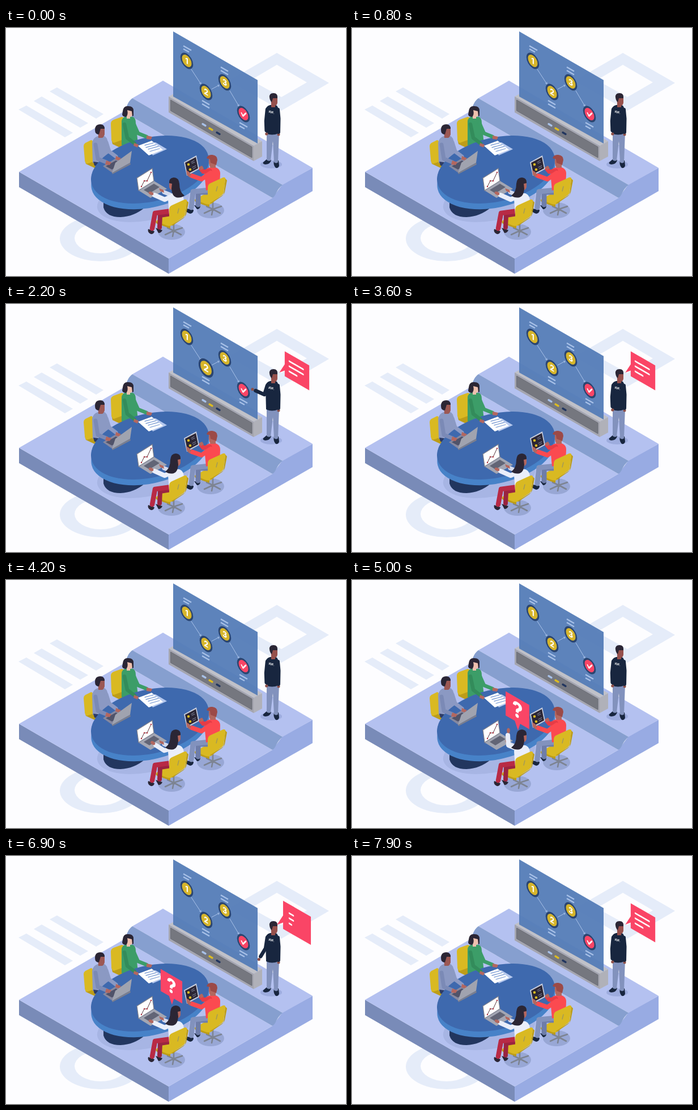
Animation of 600x438 px, one loop 8000 ms. Source, as an HTML page:

```html
<!DOCTYPE html>
<html lang="en">
<head>
<meta charset="utf-8">
<title>Team meeting</title>
<style>
html, body { margin: 0; width: 100%; height: 100%; overflow: hidden; background: #fdfdff }
svg { display: block; width: 600px; height: 438px }
text { font-family: Inter, "Open Sans", sans-serif; font-weight: 800; fill: #fff; text-anchor: middle }
.line { fill: none; stroke-linecap: round; stroke-linejoin: round }
.yellow { fill: #d9b922 } .gold { fill: #bd9d18 }
.skin { fill: #b3675f } .dark { fill: #2b2635 } .navy { fill: #18263f }
.deco { fill: #e5ecf9 }
.pale { stroke: #a8c1e8; stroke-width: 2.2; stroke-linecap: butt }
</style>
</head>
<body>
<svg viewBox="0 0 600 438">
  <defs>
    <g id="chairBase">
      <ellipse cx="292" cy="360" rx="24" ry="14" fill="#98a7d5"/>
      <path class="line" stroke="#7d8492" stroke-width="2.600" d="M296 345V358L281 365M296 358L285 353M296 358L309 365M296 358L311 353M296 358L294 368"/>
      <path class="gold" d="M264 341L290 349V354L267 346Q264 345 264 341Z"/>
      <path class="yellow" d="M264 341L284 330L313 331L294 348Q290 351 284 349Z"/>
    </g>
    <g id="chairBack">
      <path class="gold" d="M292 348L316 333L319 305L322 308L318 329Q317 333 313 336L294 349Z"/>
      <path class="yellow" d="M288 321Q288 315 293 313L315 303Q320 302 319 307L316 329Q316 332 313 334L295 346Q289 349 288 344Z"/>
      <path class="line" stroke="#a39a58" stroke-width="1.500" d="M305 319L303 327"/>
    </g>
  </defs>

  <!-- backdrop -->
  <path class="deco" fill-rule="evenodd" d="M478 44L570 97L486 146L393 93ZM478 65L432 92L486 122L531 96Z"/>
  <path class="deco" d="M22 144L36 137L118 185L104 193ZM49 129L63 121L145 168L131 176ZM77 112L90 105L172 152L159 160Z"/>
  <ellipse class="deco" cx="167" cy="372" rx="72" ry="40"/>
  <ellipse cx="167" cy="371" rx="46" ry="27" fill="#fdfdff"/>

  <!-- platform -->
  <path fill="#798bb8" d="M23 254L287 407V434L23 281Z"/>
  <path fill="#98abe3" d="M287 407L470 300L488 276L541 247V288L287 434Z"/>
  <path fill="#b4c1f0" d="M23 254L207 148L470 300L287 407ZM223 124L277 93L541 247L488 277Z"/>
  <path fill="#869fcf" d="M223 124L488 277Q481 283 477 291Q474 298 470 300L207 148Q211 145 213 138Q217 128 223 124Z"/>

  <!-- screen and console -->
  <path fill="#c0c1c8" d="M287 121L302 113L452 200L437 208Z"/>
  <path fill="#557db8" fill-opacity=".95" d="M295 6L444 92V204L295 121Z"/>
  <path fill="#a4a5af" d="M287 121L437 208V235L287 149Z"/>
  <path fill="#b0b1b9" d="M437 208L452 200V227L437 235Z"/>
  <path fill="#75777f" stroke="#63656f" stroke-width=".8" d="M290.500 127L434 210V229L290.500 146Z"/>
  <g class="line" stroke-width="3.4">
    <path stroke="#a8c1e8" d="M347 169.500L352 172.500"/>
    <path stroke="#dcbb22" d="M359 177L364 180"/>
    <path stroke="#22365f" d="M372 184.500L377 187.500"/>
  </g>
  <path class="line pale" d="M313 31.500L327 39.500M313 37L323 42.500M346 128L359 135.500M346 134L359 141.500M379 69L392 76.500M379 75L392 82.500M412 167L426 175M412 173L421 178"/>
  <path class="line" stroke="#a8c1e8" d="M327 73L344 99M341.500 97.500L344 99L344 96M363 108L376 101M373.500 101L376 101L375 103.500M395 111L411 138M408.500 136.500L411 138L411 135"/>
  <g id="steps"></g>

  <!-- presenter -->
  <ellipse cx="468" cy="241" rx="19" ry="7" fill="#9dacde"/>
  <path class="navy" d="M461 231L468 233Q467 240 458 241Q452 240 454 237ZM473 234H481L482 243Q481 248 476 247Q471 242 473 234Z"/>
  <path fill="#8292bd" d="M460 184H482L480 237Q477 240 473 237L471 200L467 234Q463 236 460 233Z"/>
  <circle cx="481" cy="188" r="2.500" fill="#8d5049"/>
  <path class="line" stroke="#18263f" stroke-width="6" d="M480 144L481.500 160L481 184"/>
  <path class="navy" d="M458 147Q458 138 466 136H476Q481 138 481 148V186Q469 191 459 186Z"/>
  <path fill="#96504c" d="M467 122H479V132Q478 137 475 137V140H468V133Z"/>
  <path class="dark" d="M465 123Q464 115 472 115Q480 115 479 124L471 124L469 131Q466 129 465 123Z"/>
  <text font-size="5.500" transform="matrix(.9 .25 0 1 468 150.500)">JOF.</text>
  <circle id="hand" r="2.600" fill="#8d5049"/>
  <path id="arm" class="line" stroke="#18263f" stroke-width="6.500"/>

  <!-- far side of the table -->
  <path class="gold" d="M186 196L206 194L217 207L207 214L188 205Z"/>
  <path class="yellow" d="M185 169Q185 164 190 162L204 157Q208 157 208 161L209 196L190 203Q186 200 186 196Z"/>
  <path fill="#3c9d68" d="M204 164Q206 156 214 156L224 157Q229 159 229 168L233 205L224 212L204 207Z"/>
  <path fill="#eec0ae" d="M213 143H223V153Q222 157 219 157V160H213Z"/>
  <path class="dark" d="M206 147Q207 137 216 138Q225 138 225 146V155L223 156L222 147L214 145Q216 153 212 157Q206 157 205 153Z"/>
  <path class="gold" d="M139 233L155 231L167 241L156 247L141 240Z"/>
  <path class="yellow" d="M137 209Q137 205 140 203L150 198Q153 198 153 202L155 236L142 240Q139 237 139 233Z"/>
  <path fill="#8b99c3" d="M152 203Q154 193 162 191L172 190Q179 192 180 204L185 232L178 242L153 238Z"/>
  <path fill="#2c3b66" d="M154 236L176 239L178 247L156 243Z"/>
  <path fill="#9c5854" d="M162 176H174V188Q172 194 169 194H163Z"/>
  <path class="dark" d="M157 180Q157 170 166 170Q174 170 174 178L167 178L164 188Q157 188 157 180Z"/>

  <!-- table -->
  <ellipse cx="242" cy="305" rx="82" ry="36" fill="#a7b5e4" transform="rotate(-9 242 305)"/>
  <path fill="#22365f" d="M172 296V317Q177 334 202 334Q226 333 245 317V296Z"/>
  <g transform="rotate(-13.200 254 250)">
    <ellipse cx="252" cy="260" rx="106" ry="56.400" fill="#4782c8"/>
    <ellipse cx="254" cy="250" rx="106" ry="56.400" fill="#3e69ae"/>
  </g>

  <!-- papers, arms and laptop on the far side -->
  <path fill="#b5c8ee" d="M246 203L264 202L284 214L259 225Z"/>
  <path fill="#fff" d="M233 208L257 199L277 215L252 225Z"/>
  <path class="line" stroke="#7d9dd4" stroke-width="1.300" d="M245 207L260 203M247 211L265 206M251 214L269 209M254 218L271 213"/>
  <path class="line" stroke="#3c9d68" stroke-width="6.500" d="M225 168L233 186L248 192"/>
  <path class="line" stroke="#338c5b" stroke-width="6.500" d="M209 170L214 194L227 204"/>
  <path class="skin" d="M248 190L258 192L256 197L248 196ZM226 203L234 206L232 211L225 208Z"/>
  <path fill="#8588a0" d="M171 244L194 230L211 238L188 256Z"/>
  <path fill="#50536a" d="M176 244L194 234L203 239L187 250Z"/>
  <path class="line" stroke="#8b99c3" stroke-width="7" d="M177 202L182 218L194 227"/>
  <path class="line" stroke="#7b8ab6" stroke-width="7" d="M158 206L162 231L177 237"/>
  <path class="skin" d="M194 226L203 230L199 234L193 232ZM177 234L186 237L183 242L175 241Z"/>
  <path fill="#a0a3af" d="M187 256L193 238L222 217L219 238Z"/>
  <path fill="#7c7f8e" d="M187 256L219 238L220 241L188 258Z"/>

  <!-- near laptop -->
  <path fill="#a3a6b3" d="M234 287L261 270L284 284L255 300Z"/>
  <path fill="#626576" d="M243 286L261 275L271 281L253 292Z"/>
  <path fill="#fff" stroke="#7d808e" stroke-width="1.300" d="M231 265L258 248L261 270L234 287Z"/>
  <path class="line" stroke="#54343c" d="M239 280L244 270L249 270L256 255"/>
  <g fill="#b3303f"><circle cx="239" cy="280" r="1.200"/><circle cx="244" cy="270" r="1.200"/><circle cx="249" cy="270" r="1.200"/><circle cx="256" cy="255" r="1.200"/></g>

  <!-- man in red -->
  <use href="#chairBase" x="69" y="-38"/>
  <path class="navy" d="M319 319L331 321Q331 327 325 328Q317 325 317 322ZM332 313L343 315Q342 320 337 320Z"/>
  <path class="line" stroke="#6e7da9" stroke-width="9" d="M358 290L339 290L339 312"/>
  <path class="line" stroke="#8292bd" stroke-width="9" d="M360 286L330 289L327 317"/>
  <path fill="#fb4a50" d="M350 255Q352 247 361 246H370Q378 249 378 257L377 280L353 287Z"/>
  <path class="line" stroke="#e63c46" stroke-width="7" d="M360 252L348 254L344 249"/>
  <path class="skin" d="M340 246L346 243L349 248L344 251ZM358 232H370V247H361Q357 241 358 232Z"/>
  <path fill="#9c4a47" d="M354 230Q356 223 364 224Q373 225 373 233L371 242L361 238L360 232Z"/>
  <path fill="#c9cedd" d="M314 237L336 225L341 249L319 261Z"/>
  <path class="dark" d="M316 238L335 228L339 248L320 258Z"/>
  <g class="yellow"><circle cx="322" cy="241" r="2.300"/><circle cx="325" cy="250" r="2.300"/></g>
  <path class="line" stroke="#8a90a8" d="M327 237L332 234M328 239L333 237M329 246L335 243M330 249L335 246"/>
  <path class="line" stroke="#fb4a50" stroke-width="8" d="M361 256L345 267L328 261"/>
  <path class="skin" d="M318 251L323 254L327 259L324 264L319 259Z"/>
  <use href="#chairBack" x="68" y="-39"/>

  <!-- woman in white -->
  <use href="#chairBase"/>
  <path class="dark" d="M251 355L262 359Q261 364 256 364Q249 361 251 355ZM264 353L276 357Q274 362 269 362Z"/>
  <path class="line" stroke="#9a2440" stroke-width="8" d="M297 327L272 331L271 352"/>
  <path class="line" stroke="#b82a45" stroke-width="8.500" d="M299 322L263 327L258 354"/>
  <path class="line" stroke="#d5dbee" stroke-width="7" d="M289 294L279 290"/>
  <path class="skin" d="M270 283L278 286L279 291L272 288Z"/>
  <path fill="#eaeefa" d="M286 303Q287 293 296 291L306 292Q314 295 314 306L316 328L288 330Z"/>
  <path id="sleeve" class="line" stroke="#eaeefa" stroke-width="8"/>
  <ellipse id="palm" class="skin" rx="2.800" ry="4.500"/>
  <g id="head">
    <path class="skin" d="M301 270H308L308 281Q306 287 302 286L300 292H296Z"/>
    <path class="dark" d="M290 275Q291 264 300 264Q309 265 308 274L303 275L304 284Q303 297 296 299Q288 301 281 296Q290 290 290 275Z"/>
  </g>
  <use href="#chairBack"/>

  <!-- speech bubbles -->
  <g id="talk">
    <path fill="#fa4566" d="M-25 -22H25V22H-25V12L-36 21L-25 1Z"/>
  </g>
  <path id="words" class="line" stroke="#fff" stroke-width="3"/>
  <g id="ask">
    <path fill="#fa4566" d="M-22 -19.500H22V19.500H5L1 32L-5 19.500H-22Z"/>
    <text y="12" font-size="34">?</text>
  </g>
</svg>
<script>
const $ = id => document.getElementById(id);
const set = (id, attrs) => { for (const k in attrs) $(id).setAttribute(k, attrs[k]); };
const clamp = x => Math.max(0, Math.min(1, x));
const ramp = (t, a, b) => clamp((t - a) / (b - a));
const ease = (t, a, b) => { const x = ramp(t, a, b); return x * x * (3 - 2 * x); };
const mix = (a, b, p) => a + (b - a) * p;
const wall = (x, y, s = 1) => `matrix(${.866 * s} ${.5 * s} 0 ${s} ${x} ${y})`;

// Grows past full size, settles, then shrinks away
function pop(t, start, end) {
  const grow = 1.14 * ease(t, start, start + 300) - .14 * ease(t, start + 300, start + 700);
  return grow * (1 - ease(t, end, end + 250));
}

const steps = [[319, 58, '1', 1500], [353, 113, '2', 2050], [386, 96, '3', 2600], [419, 152, '', 3150]];
$('steps').innerHTML = steps.map(([, , label], i) => `<g id="step${i}">
  <circle r="13" fill="#2b4570"/><circle r="9.800" fill="${label ? '#d6b52b' : '#fa4566'}"/>
  ${label ? `<text y="5" font-size="14">${label}</text>`
          : '<path class="line" stroke="#fff" stroke-width="2.300" d="M-4 0L-1 4L5 -4"/>'}</g>`).join('');

function draw(t) {
  steps.forEach(([x, y, , peak], i) => {
    const s = 1 + .28 * Math.sin(Math.PI * ramp(t, peak - 350, peak + 350)) ** 2;
    set('step' + i, { transform: wall(x, y, s) });
  });

  const point = ease(t, 1050, 1450) - ease(t, 3200, 3550) + ease(t, 6760, 7160) - ease(t, 7400, 7750);
  const angle = mix(88, 204, point) * Math.PI / 180;
  const ex = mix(459, 456, point), ey = mix(164, 160, point);
  const reach = r => [ex + r * Math.cos(angle), ey + r * Math.sin(angle)];
  const [hx, hy] = reach(23);
  set('arm', { d: `M461 144L${ex} ${ey}L${reach(17)}` });
  set('hand', { cx: hx, cy: hy });

  const start = t < 5000 ? 950 : 6550;
  const size = pop(t, start, t < 5000 ? 3900 : 9000);
  const typed = ramp(t, start + 220, start + 680);
  set('talk', { transform: wall(513.5, 118, size) });
  const rows = [28, 28, 15].map((w, i) => `M-15.500 ${i * 9 - 9}h${w * typed}`);
  set('words', { d: typed ? rows.join('') : '', transform: wall(513.5, 118, Math.min(1, size)) });

  const raised = ease(t, 4100, 4500) - ease(t, 5400, 5800);
  const px = mix(262, 275, raised), py = mix(295, 274, raised);
  set('sleeve', { d: `M291 298L${mix(280, 276, raised)} ${mix(303, 292, raised)}L${px} ${py}` });
  set('palm', { transform: `translate(${mix(256, 276, raised)} ${mix(292, 266, raised)}) rotate(${mix(-65, 0, raised)})` });
  set('head', { transform: `translate(298 0) scale(${mix(-1, 1, ease(t, 300, 700))} 1) translate(-298 0)` });
  set('ask', { transform: wall(292, 230, pop(t, 4550, 7250)) });
}

function frame() {
  draw(performance.now() % 8000);
  requestAnimationFrame(frame);
}
frame();
</script>
</body>
</html>
```
